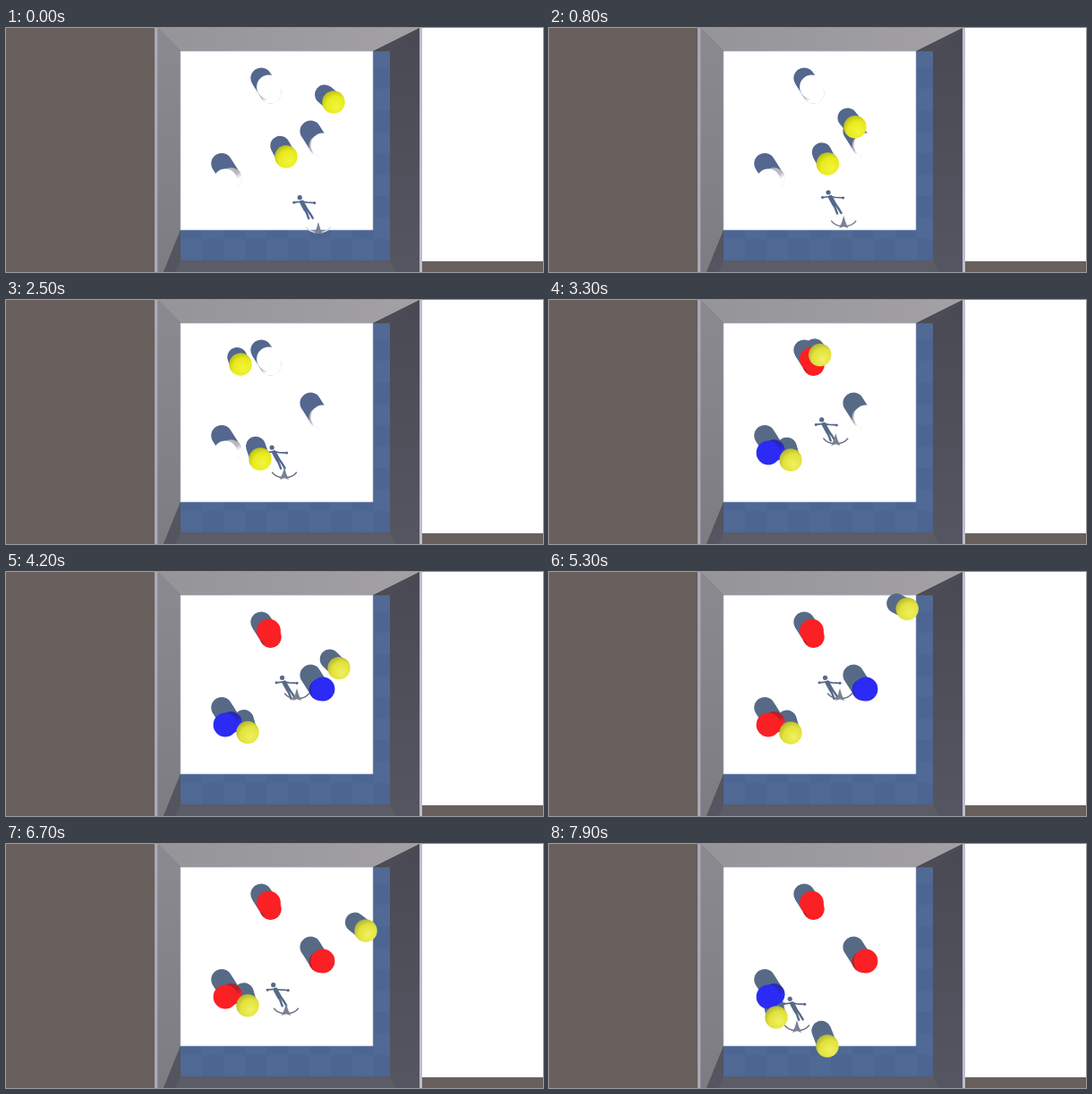
An HTML page for the animation above (8 s loop, 600 by 273 pixels).

```html
<!DOCTYPE html>
<html lang="en">
<head>
<meta charset="utf-8">
<title>Ball arena</title>
<style>
html, body { margin: 0; width: 100%; height: 100%; overflow: hidden; background: #695f5c; }
svg { display: block; width: 600px; height: 273px; --shade: #53678f; --lit: #f3f53c; --mid: #e8ea1c; --dim: #b2b51c; }
svg.late { --shade: #566a86; --lit: #f0f160; --mid: #e1e23a; --dim: #a9ab38; }
.shade { fill: none; stroke: var(--shade); stroke-linecap: round; }
#shades { filter: blur(.6px); }
</style>
</head>
<body>
<svg id="stage" viewBox="0 0 600 273">
  <defs>
    <radialGradient id="yellow" cx=".62" cy=".68" r=".75">
      <stop offset="0" stop-color="var(--lit)"/>
      <stop offset=".6" stop-color="var(--mid)"/>
      <stop offset="1" stop-color="var(--dim)"/>
    </radialGradient>
    <linearGradient id="side" x1=".23" y1=".08" x2=".77" y2=".92">
      <stop offset=".45" stop-color="#223" stop-opacity=".32"/>
      <stop offset=".7" stop-color="#223" stop-opacity="0"/>
    </linearGradient>
    <linearGradient id="topWall">
      <stop offset="0" stop-color="#959499"/>
      <stop offset="1" stop-color="#a3a1a4"/>
    </linearGradient>
    <linearGradient id="leftWall" x2="0" y2="1">
      <stop offset="0" stop-color="#8b8a8f"/>
      <stop offset="1" stop-color="#7d7c83"/>
    </linearGradient>
    <linearGradient id="rightWall" x2="0" y2="1">
      <stop offset="0" stop-color="#484952"/>
      <stop offset="1" stop-color="#555661"/>
    </linearGradient>
    <pattern id="tiles" x="195" y="236" width="48" height="48" patternUnits="userSpaceOnUse">
      <path fill="#4c6591" d="M0 0h48v48H0z"/>
      <path fill="#506995" d="M0 0h24v24H0zM24 24h24v24H24z"/>
    </pattern>
  </defs>

  <path fill="#695f5c" d="M0 0h600v273H0z"/>
  <path fill="#fff" d="M464 0h136v261H464z"/>
  <path fill="#5b5c66" d="M167 0h297v273H167z"/>
  <path fill="url(#topWall)" d="M169 0H462L410 26H195z"/>
  <path fill="#4b4c55" d="M462 0L429 26H410z"/>
  <path fill="url(#leftWall)" d="M169 0L195 26V226L176 273H169z"/>
  <path fill="#54555e" d="M195 226V260L189 273H176z"/>
  <path fill="url(#rightWall)" d="M462 0V273H435L429 260V26z"/>
  <path fill="#aaa9b6" d="M166 0h3.3v273H166z"/>
  <path fill="#bdbdce" d="M462 0h3v273h-3z"/>
  <path fill="url(#tiles)" d="M195 26h234v234H195z"/>
  <path fill="#fff" stroke="#b5c2d8" stroke-width=".6" d="M195 26h215v200H195z"/>

  <g id="shades"></g>
  <g id="pillars"></g>
  <g id="agent">
    <path fill="none" stroke="currentColor" stroke-width="1.4" stroke-linecap="round" d="M-13.5-2Q-9 4 0 3.5Q9 4 13.5-2"/>
    <path fill="#7b8193" d="M0-8L2-1L5 6L0 4L-5 6L-2-1z"/>
  </g>
  <g id="balls"></g>
</svg>
<script>
const LOOP = 8000, STEP = 100, EYE = [317, 140];
const $ = id => document.getElementById(id);
const stage = $('stage'), agent = $('agent');

function set(el, attrs) {
  for (const k in attrs) el.setAttribute(k, attrs[k]);
}
function add(parent, tag, attrs) {
  const el = document.createElementNS('http://www.w3.org/2000/svg', tag);
  set(el, attrs);
  return $(parent).appendChild(el);
}

// Pull a raised point towards the camera axis, then shift it along the light.
const cast = (p, scale, dx = 0, dy = 0) =>
  [EYE[0] + (p[0] - EYE[0]) * scale + dx, EYE[1] + (p[1] - EYE[1]) * scale + dy];

// Straight runs between [time, x, y] turning points.
function along(path, t) {
  const i = Math.max(1, path.findIndex(p => p[0] >= t));
  const [t0, x0, y0] = path[i - 1], [t1, x1, y1] = path[i];
  const k = (t - t0) / (t1 - t0);
  return [x0 + (x1 - x0) * k, y0 + (y1 - y0) * k];
}

// Each touch flips a pillar: blue, red, blue...
const pillars = [
  { at: [293.5, 66], touches: [2700, 2800] },
  { at: [354, 131], touches: [4100, 6000] },
  { at: [245, 171], touches: [3300, 4900, 7600] },
];
for (const p of pillars) {
  const base = cast(p.at, .91), tip = cast(base, 1, -10.5, -16.5);
  const disc = ([cx, cy], r, fill) => add('pillars', 'circle', { cx, cy, r, fill });
  add('shades', 'path', { class: 'shade', 'stroke-width': 23.5, d: `M${tip}L${base}` });
  p.base = disc(base, 12);
  disc(base, 12.1, 'url(#side)');
  p.top = disc(p.at, 13.4);
}
function pillarColor(touches, t) {
  const n = touches.filter(at => at <= t).length;
  return n ? (n % 2 ? '#2b2bf5' : '#fb2024') : '#fff';
}

const balls = [
  [[0, 366, 83], [1500, 321, 135], [1980, 300, 39], [2500, 262, 72], [2900, 271, 39],
   [4160, 371, 110], [5370, 402, 37], [6000, 416, 65], [6700, 402, 97], [7250, 404, 167], [7900, 311, 226]],
  [[0, 313, 144], [1500, 310, 159], [2500, 284, 178], [3300, 270, 179], [7200, 270, 181], [7900, 254, 194]],
].map(path => ({
  path,
  shade: add('shades', 'path', { class: 'shade', 'stroke-width': 22 }),
  body: add('balls', 'circle', { r: 12.7, fill: 'url(#yellow)' }),
}));

const walk = [[0, 349, 225], [1500, 312, 212], [2500, 311, 195], [3700, 325, 138],
  [5500, 325, 138], [6700, 313, 186], [7900, 277, 205]];
const figure = add('shades', 'g', { fill: 'var(--shade)' });
figure.innerHTML = `
  <circle r="2.6"/>
  <path class="shade" stroke-width="5" d="M2.5 5.5L6.5 13"/>
  <path class="shade" stroke-width="1.7" d="M-6.5 5.5L2 4.5L8 5.5L17 6"/>
  <path class="shade" stroke-width="2.4" d="M5.5 13L8 18L10 23.5M8 13L11.5 18L14.5 23"/>
  <circle cx="-6.5" cy="5.5" r="1.5"/><circle cx="16.5" cy="6" r="1.5"/>`;

function draw(t) {
  stage.classList.toggle('late', t >= 2800);
  for (const p of pillars) {
    const fill = pillarColor(p.touches, t);
    set(p.top, { fill });
    set(p.base, { fill });
  }
  for (const b of balls) {
    const at = along(b.path, t);
    set(b.body, { cx: at[0], cy: at[1] });
    set(b.shade, { d: `M${cast(at, .94, -7, -12)}L${at}` });
  }
  const spot = along(walk, t);
  set(agent, { transform: `translate(${spot})`, color: spot[1] > 221 ? '#d9dce4' : '#6a7186' });
  set(figure, { transform: `translate(${cast(spot, .82, -15, -20)})` });
}

const start = performance.now();
function tick(now) {
  const t = Math.max(0, now - start) % LOOP;
  draw(Math.min(7900, Math.floor(t / STEP) * STEP));
  requestAnimationFrame(tick);
}
draw(0);
requestAnimationFrame(tick);
</script>
</body>
</html>
```
